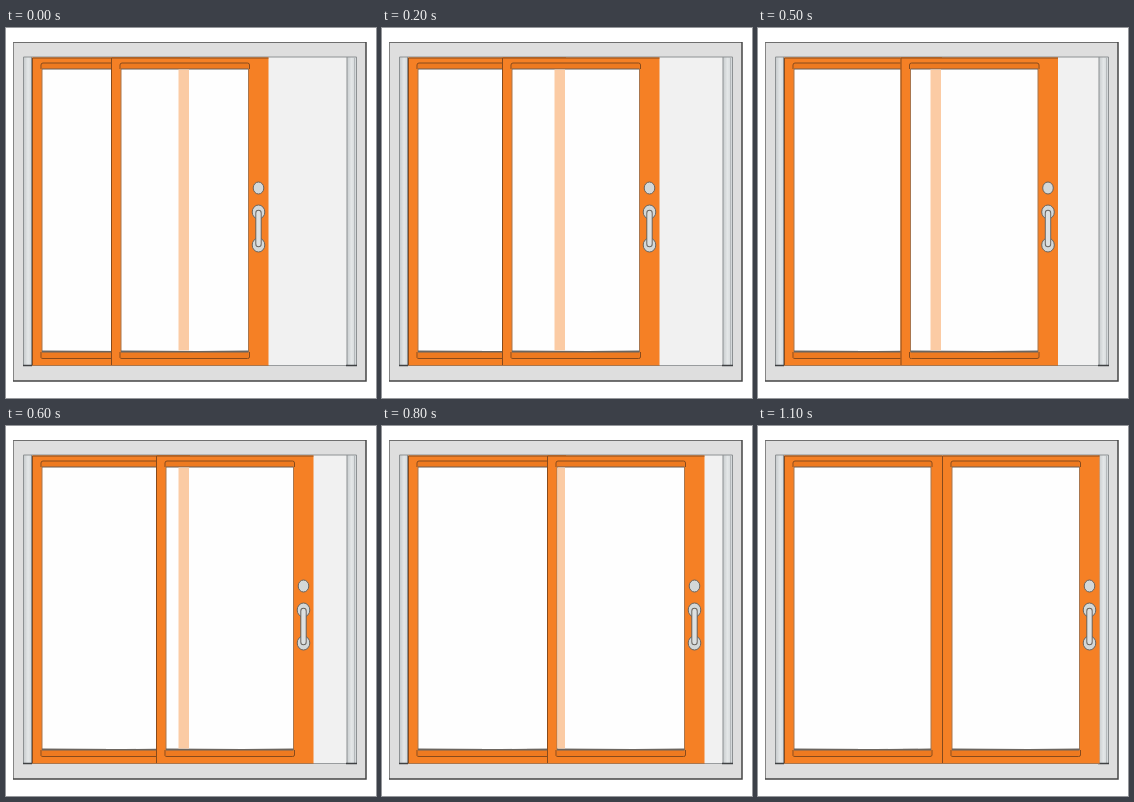
Animation of 370 by 370 pixels, one loop 1400 ms. Source, as an HTML page:

```html
<!DOCTYPE html>
<html lang="en">
<head>
<meta charset="utf-8">
<title>Sliding door</title>
<style>
  html, body { margin: 0; width: 100%; height: 100%; overflow: hidden; background: #fff; }
  svg { display: block; width: 100vw; height: 100vh; }
  path { fill: none; }
  .wood { fill: #f58025; }
  .rail { fill: #ee7a20; }
  .seam { stroke: #874a1c; }
  .rim { stroke: #a8764e; }
  .edge { stroke: #6b5b4e; }
  .glass { fill: #fefefe; }
  .metal { fill: #d3d8d9; stroke: #6a6560; }
</style>
</head>
<body>
<svg viewBox="0 0 370 370">
  <defs>
    <linearGradient id="jamb">
      <stop offset="0" stop-color="#c9cdcf"/>
      <stop offset=".5" stop-color="#e3e6e7"/>
      <stop offset="1" stop-color="#d3d7d9"/>
    </linearGradient>
    <filter id="soften" filterUnits="userSpaceOnUse" x="0" y="0" width="370" height="370"
      color-interpolation-filters="sRGB">
      <feGaussianBlur stdDeviation=".5"/>
    </filter>
  </defs>

  <g filter="url(#soften)">
    <!-- Outer frame and opening -->
    <rect x="7.5" y="14.5" width="352.5" height="338.5" fill="#dedede"/>
    <path d="M7.5 353V14.5" stroke="#858585"/>
    <path d="M7 14.5H360" stroke="#6e6e6e"/>
    <path d="M360 14V353H7" stroke="#454545" stroke-width="1.5"/>
    <rect x="18" y="29" width="332" height="308.5" fill="#f1f1f1"/>
    <rect x="18" y="29" width="8" height="308" fill="url(#jamb)"/>
    <rect x="341" y="29" width="9" height="308" fill="url(#jamb)"/>
    <path d="M17.5 337V29H350.5V337" stroke="#8d9193"/>
    <path d="M25.5 29V337M341 29V337" stroke="#8b8f91"/>
    <path d="M348.5 30V337" stroke="#b5b9bb"/>
    <path d="M26 337.5H341" stroke="#999c9e"/>
    <path d="M17 337.5H26M340 337.5H351" stroke="#3f4143" stroke-width="1.5"/>

    <g id="fixed"></g>
    <g id="door"></g>
  </g>
</svg>
<script>
  const FIXED = { x: 26, w: 158, stile: 10, right: 11 };
  const DOOR = { x: 105, w: 157.5, stile: 10, right: 20 };
  const SHIFTS = [0, 7.5, 15, 22.5, 30, 37.5, 45, 52.5, 60, 67, 73, 79];
  const STEP = 100, LOOP = 1400;
  const STRIPE = { x: 172.5, end: 183 };

  function panel({ x, w, stile, right }) {
    const l = x + stile, r = x + w - right, gw = r - l;
    return `
      <rect class="wood" x="${x}" y="29.5" width="${w}" height="308"/>
      <path class="seam" d="M${x + .5} 337V30H${x + w}"/>
      <path class="rim" d="M${x} 337.5H${x + w}"/>
      <rect class="rail" x="${l}" y="35" width="${gw}" height="6"/>
      <rect class="rail" x="${l}" y="324" width="${gw}" height="6.5"/>
      <path class="seam" d="M${l - 1} 41V37Q${l - 1} 35 ${l + 1} 35H${r - 1}Q${r + 1} 35 ${r + 1} 37V41
        M${l - 1} 324V329.5Q${l - 1} 330.5 ${l + 1} 330.5H${r - 1}Q${r + 1} 330.5 ${r + 1} 329V324"/>
      <rect class="glass" x="${l}" y="41" width="${gw}" height="283"/>
      <path class="rim" d="M${l} 41V324M${r} 41V324"/>
      <path class="edge" d="M${l} 41H${r}"/>
      <polygon points="${l},322.5 ${l + gw * .6},323 ${r},322.5 ${r},324.5 ${l},324.5" fill="#6b655f"/>`;
  }

  const bar = 'd="M252.5 185V216" stroke-linecap="round"';
  const handle = `
    <ellipse class="metal" cx="252.5" cy="160" rx="5.3" ry="6"/>
    <ellipse class="metal" cx="252.5" cy="184" rx="6.3" ry="7"/>
    <ellipse class="metal" cx="252.5" cy="217" rx="6.3" ry="7"/>
    <path ${bar} stroke="#6a6560" stroke-width="6.4"/>
    <path ${bar} stroke="#dde1e2" stroke-width="4.4"/>`;

  const door = document.getElementById('door');
  document.getElementById('fixed').innerHTML = panel(FIXED);
  door.innerHTML = panel(DOOR) +
    '<rect id="stripe" y="41.5" height="281" fill="#fbcba4"/>' + handle;
  const stripe = document.getElementById('stripe');

  // The fixed stile shows through the part of the door glass that covers it.
  function draw(now) {
    const i = Math.min(SHIFTS.length - 1, Math.floor(now % LOOP / STEP));
    const dx = SHIFTS[i];
    const left = Math.max(STRIPE.x, DOOR.x + DOOR.stile + dx + .5);
    door.setAttribute('transform', `translate(${dx} 0)`);
    stripe.setAttribute('x', left - dx);
    stripe.setAttribute('width', Math.max(0, STRIPE.end - left));
  }

  const start = performance.now();
  function tick() {
    draw(performance.now() - start);
    requestAnimationFrame(tick);
  }
  tick();
</script>
</body>
</html>
```
